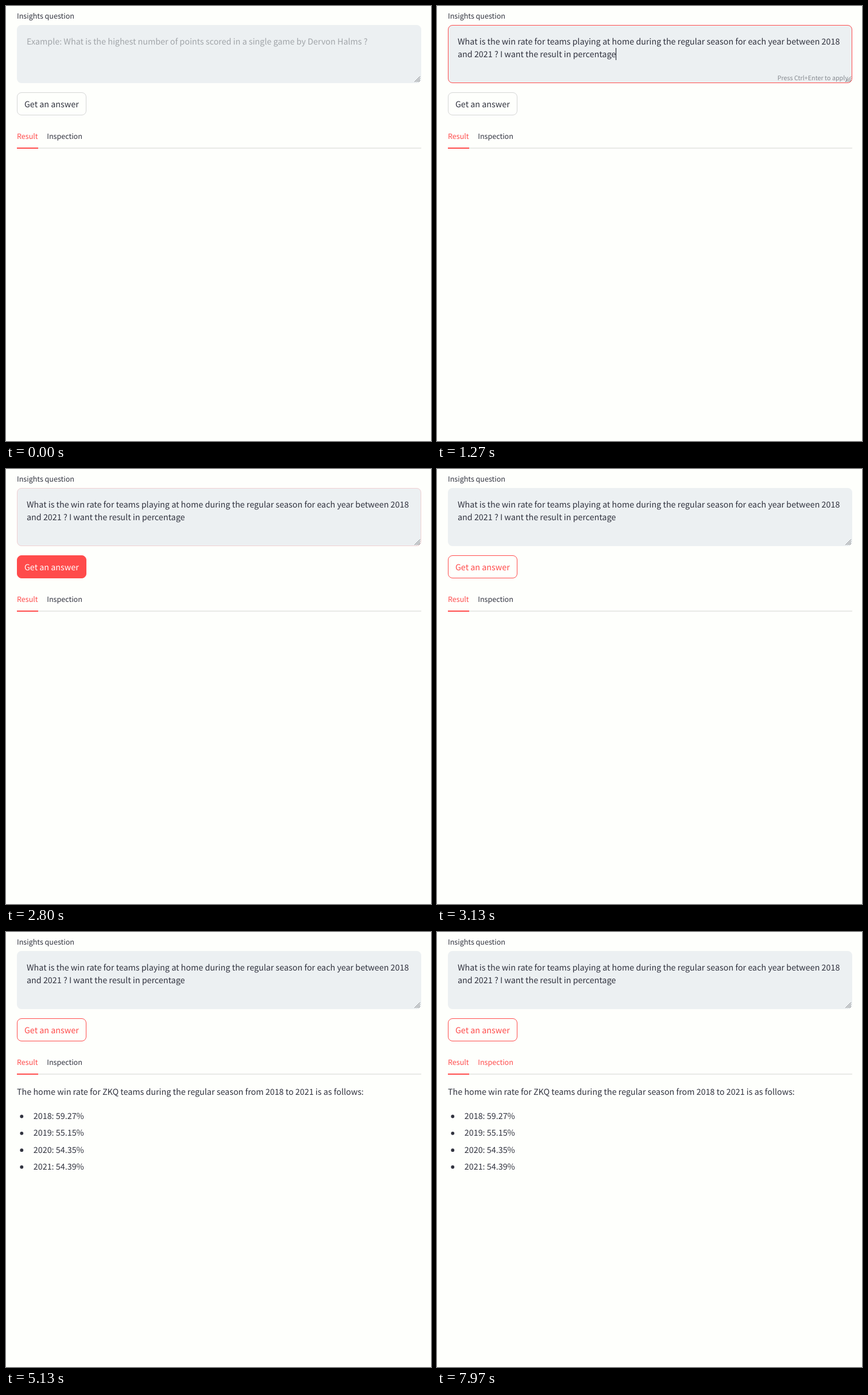
An HTML page that plays this animation: 740x756 px, repeating every 8 s.

```html
<!DOCTYPE html>
<html lang="en">
<head>
<meta charset="utf-8">
<title>Insights question</title>
<style>
  html, body { margin: 0; width: 100%; height: 100%; overflow: hidden; background: #fefffc; }
  svg { display: block; width: 740px; height: 756px; }
  text {
    font-family: "Noto Sans CJK JP", "Noto Sans CJK SC", "Noto Sans CJK", "Open Sans", sans-serif;
    font-size: 14.33px;
    fill: #31333f;
    white-space: pre;
    text-rendering: geometricPrecision;
  }
  .small { font-size: 12.54px; }
  .hint { font-size: 10.75px; fill: #868a90; }
  .faded { fill: #a1a5a9; }
  .red { fill: #ff4b4b; }
</style>
</head>
<body>
<svg viewBox="0 0 740 756" xmlns="http://www.w3.org/2000/svg">
  <rect width="740" height="756" fill="#fefffc"/>
  <text class="small" x="19" y="22">Insights question</text>

  <rect x="19" y="33" width="704" height="101" rx="8" fill="#ecf0f2"/>
  <rect id="focus" x="19.5" y="33.5" width="703" height="100" rx="7.5" fill="none" stroke="#ff4b4b"/>
  <text id="placeholder" class="faded" x="36" y="67">Example: What is the highest number of points scored in a single game by Dervon Halms ?</text>
  <g id="question">
    <text x="36" y="67">What is the win rate for teams playing at home during the regular season for each year between 2018</text>
    <text x="36" y="89">and 2021 ? I want the result in percentage</text>
  </g>
  <text id="hint" class="hint" x="592.7" y="129">Press Ctrl+Enter to apply</text>
  <rect id="caret" width="1.2" height="21" fill="#31333f"/>
  <path d="M711.5 132 L721 122.5 M714.8 132 L721 125.8 M718 132 L721 129" stroke="#6b6d70" fill="none"/>

  <rect id="button" x="19.5" y="150.5" width="120" height="39" rx="7.5"/>
  <text id="label" x="32" y="176">Get an answer</text>

  <text class="small red" x="19" y="231">Result</text>
  <text id="inspect" class="small" x="71.3" y="231">Inspection</text>
  <rect x="19" y="246" width="704" height="2" fill="#e9eae6"/>
  <rect x="19" y="246" width="37" height="2" fill="#ff4b4b"/>

  <g id="answer">
    <text x="19" y="283">The home win rate for ZKQ teams during the regular season from 2018 to 2021 is as follows:</text>
  </g>
</svg>
<script>
const LOOP = 8000;
const RED = '#ff4b4b', INK = '#31333f', PAPER = '#fefffc';
const FOCUS = 400, PASTE = 800, HOVER = 2400, PRESS = 2680, RELEASE = 2900;
const ANSWER = 4270, TAB_HOVER = 7230;

const $ = id => document.getElementById(id);
const show = (id, on) => $(id).setAttribute('visibility', on ? 'visible' : 'hidden');
const set = (id, attrs) => {
  for (const key in attrs) $(id).setAttribute(key, attrs[key]);
};
const ramp = (t, start, length) => Math.min(1, Math.max(0, (t - start) / length));

function add(tag, attrs, text = '') {
  const node = document.createElementNS('http://www.w3.org/2000/svg', tag);
  for (const key in attrs) node.setAttribute(key, attrs[key]);
  node.textContent = text;
  $('answer').append(node);
}

['59.27', '55.15', '54.35', '54.39'].forEach((rate, i) => {
  const y = 325 + i * 29.33;
  add('circle', { cx: 27.3, cy: y - 4.5, r: 2.9, fill: INK });
  add('text', { x: 47.8, y }, `${2018 + i}: ${rate}%`);
});

function render(t) {
  const pasted = t >= PASTE;
  const focused = t >= FOCUS && t < PRESS;
  const hovered = t >= HOVER;
  const pressed = t >= PRESS && t < RELEASE;

  set('focus', { opacity: ramp(t, FOCUS, 150) - ramp(t, PRESS, 150) });
  show('placeholder', !pasted);
  show('question', pasted);
  show('hint', pasted && focused);

  const blinkStart = pasted ? PASTE : FOCUS;
  show('caret', focused && (t - blinkStart) % 1000 < 500);
  set('caret', pasted ? { x: 311, y: 73 } : { x: 36, y: 51 });

  set('button', {
    fill: pressed ? RED : PAPER,
    stroke: hovered ? RED : '#d5d6d6'
  });
  $('label').style.fill = pressed ? '#fff' : hovered ? RED : INK;
  $('inspect').style.fill = t >= TAB_HOVER ? RED : INK;
  show('answer', t >= ANSWER);
}

const start = performance.now();
function tick() {
  render((performance.now() - start) % LOOP);
  requestAnimationFrame(tick);
}
tick();
</script>
</body>
</html>
```
